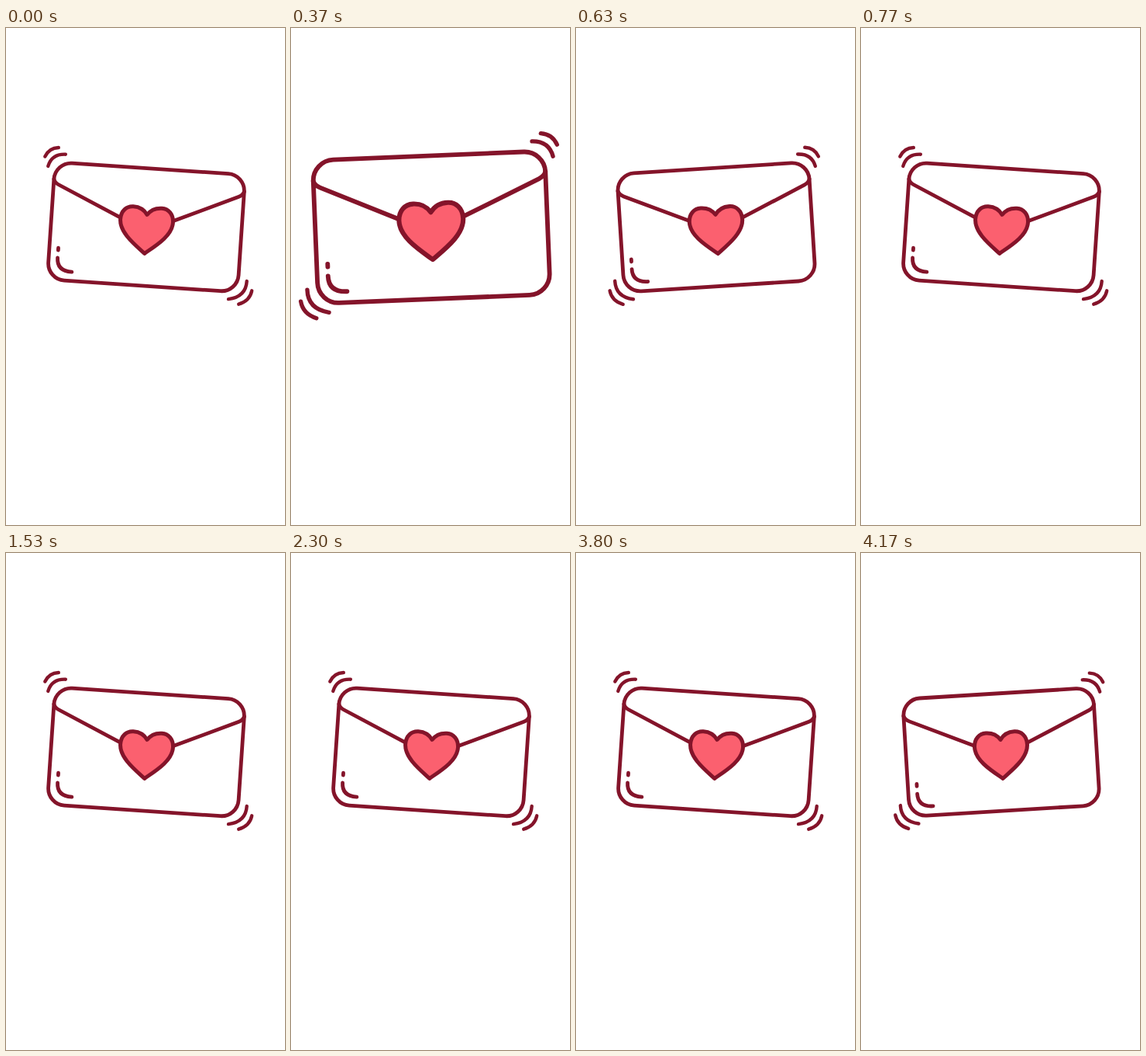
Write an HTML page that moves like this. It is 360x640 px and loops after 4.31 s.

```html
<!DOCTYPE html>
<html lang="en">
<head>
<meta charset="utf-8">
<title>Love letter</title>
<style>
  html, body { margin: 0; width: 100%; height: 100%; overflow: hidden; background: #fff; }
  svg { display: block; width: 100%; height: 100%; }
</style>
</head>
<body>
<svg viewBox="0 0 360 640" fill="none" stroke="#84142a" stroke-width="4.8" stroke-linecap="round" stroke-linejoin="round">
  <g id="pulse">
    <g id="letter">
      <rect x="-123" y="-75.7" width="246" height="151.4" rx="22"/>
      <path d="M-123 -54Q-122 -49.5 -116 -46.7L-35 -10.5M123 -54Q122 -49.5 116 -46.7L35 -10.5"/>
      <path fill="#fb606f" stroke-width="5" d="M0 34C-14 23 -34 9 -34 -8C-34 -19 -27 -25.5 -18.5 -25.5C-10 -25.5 -4 -22 0 -16C4 -22 10 -25.5 18.5 -25.5C27 -25.5 34 -19 34 -8C34 9 14 23 0 34Z"/>
      <path d="M-111.4 34.3V37.3M-111.5 47Q-111.5 64 -92 64"/>
      <g id="shake" stroke-width="4.4">
        <path d="M-136.5 -82Q-131.9 -93.3 -119.8 -94.6M-131.7 -69.8Q-128 -86 -110.2 -86.5"/>
        <path d="M134.1 60.6Q134.3 81 112 85.4M141.4 72.6Q139.7 85.8 125.6 91"/>
      </g>
    </g>
  </g>
</svg>
<script>
  const LOOP = 4310;
  const flips = [370, 770, 1130, 1530, 1900, 2300, 2670, 3070, 3400, 3800, 4170];
  const [pulse, letter, shake] = ['pulse', 'letter', 'shake'].map(id => document.getElementById(id));
  const clamp = v => Math.min(1, Math.max(0, v));

  // Quick swell up to 400 ms, then a long settle
  function swell(t) {
    if (t < 400) {
      const p = clamp((t - 240) / 160);
      return p * p * (3 - 2 * p);
    }
    return (1 - clamp((t - 400) / 330)) ** 3;
  }

  function draw(t) {
    const left = flips.filter(f => f <= t).length % 2 === 1;
    const step = Math.floor(t * 0.03 + 0.15) / 0.03;
    const s = t < 270 ? 0 : swell(step);
    const sway = step < 400 ? 1.3 * s : 1.3 * Math.sqrt(s) * Math.cos((step - 400) / 58);
    pulse.setAttribute('transform',
      `translate(180 255) rotate(${sway}) scale(${1 + 0.246 * s}) translate(-180 -255)`);
    letter.setAttribute('transform', `translate(181 256.4) rotate(${left ? -3.5 : 3.85})`);
    shake.setAttribute('transform', `scale(${left ? -1 : 1} 1)`);
  }

  const start = performance.now();
  function tick(now) {
    draw(Math.max(0, now - start) % LOOP);
    requestAnimationFrame(tick);
  }
  draw(0);
  requestAnimationFrame(tick);
</script>
</body>
</html>
```
